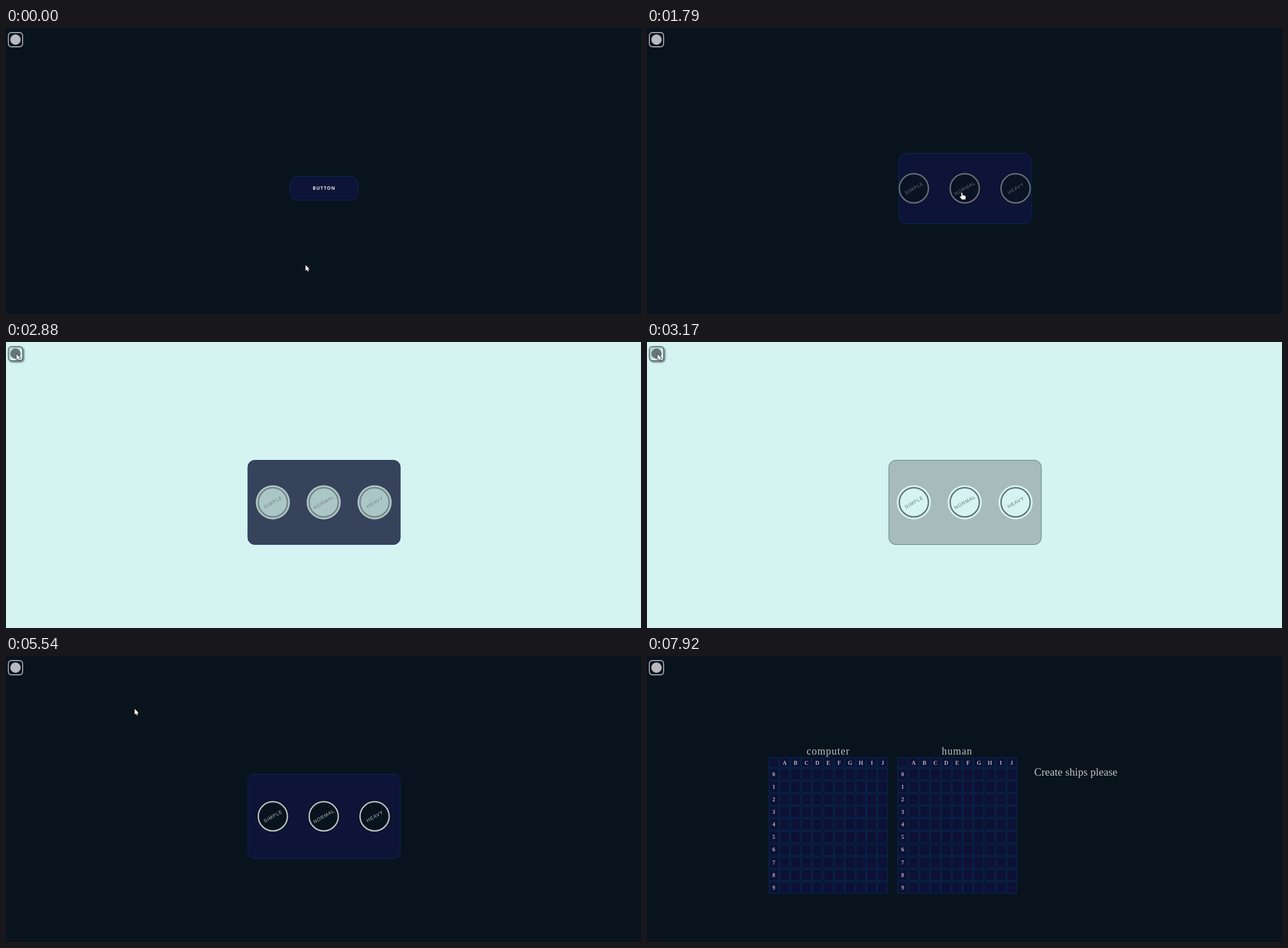
Recreate the animation shown at these times as an HTML page with a canvas. Size 1116x502 px, loop 8.96 s.

```html
<!DOCTYPE html>
<html lang="en">
<head>
<meta charset="utf-8">
<title>Board game intro</title>
<style>
html, body { margin: 0; width: 100%; height: 100%; overflow: hidden; background: #08131e; }
canvas { display: block; }
</style>
</head>
<body>
<canvas id="stage" width="1116" height="502"></canvas>
<script>
const ctx = document.getElementById('stage').getContext('2d');
const LOOP = 8960;
const TO_LIGHT = 2880, TO_DARK = 5000, BOARDS = 6060;
const SANS = '"Liberation Sans", Arial, sans-serif';
const SERIF = '"Liberation Serif", "Times New Roman", serif';

// Each colour is a [dark, light] pair.
const BG = [[8, 19, 30], [213, 243, 241]];
const PANEL = [[13, 20, 55], [167, 188, 186]];
const EDGE = [[6, 43, 92], [78, 130, 136]];
const INK = [[185, 188, 190], [100, 116, 116]];

const clamp = v => Math.max(0, Math.min(1, v));
const lerp = (a, b, p) => a + (b - a) * p;
const ramp = (t, from, to) => clamp((t - from) / (to - from));
const linear = p => p;
const smooth = p => p * p * (3 - 2 * p);
const easeIn = p => p * p;
const easeOut = p => 1 - (1 - p) ** 2;
const tint = ([a, b], p, alpha = 1) =>
  `rgba(${a.map((v, i) => Math.round(lerp(v, b[i], p))).join(',')},${alpha})`;

// Pointer moves: start, end, x, y, easing
const HOME = [526, 416];
const MOVES = [
  [300, 980, 553, 289, smooth],
  [1940, 2320, 46, 76, smooth],
  [2320, 2620, 18, 21, easeOut],
  [5400, 5790, 716, 262, smooth],
  [5790, 5940, 659, 275, smooth],
  [6700, 7230, 820, 330, easeIn],
  [7230, 7650, 1046, 477, easeOut],
  [7650, 7920, 1090, 520, linear]
];

function pointerAt(t) {
  let [x, y] = HOME;
  for (const [from, to, nextX, nextY, ease] of MOVES) {
    const p = ease(ramp(t, from, to));
    x = lerp(x, nextX, p);
    y = lerp(y, nextY, p);
  }
  return [x, y];
}

function box(x, y, w, h, r, fill, stroke, line = 1) {
  ctx.beginPath();
  ctx.roundRect(x, y, w, h, r);
  ctx.fillStyle = fill;
  ctx.fill();
  ctx.strokeStyle = stroke;
  ctx.lineWidth = line;
  ctx.stroke();
}

function disc(x, y, r, fill) {
  ctx.beginPath();
  ctx.arc(x, y, r, 0, 7);
  ctx.fillStyle = fill;
  ctx.fill();
}

function label(text, x, y, font, color, gap = 0, align = 'center') {
  ctx.font = font;
  ctx.letterSpacing = gap + 'px';
  ctx.textAlign = align;
  ctx.fillStyle = color;
  ctx.fillText(text, align === 'center' ? x + gap / 2 : x, y);
}

function drawToggle(light) {
  ctx.save();
  if (light) {
    ctx.shadowColor = 'rgba(40,60,60,.6)';
    ctx.shadowBlur = 3;
    ctx.shadowOffsetX = ctx.shadowOffsetY = 2;
  }
  box(4.1, 8, 25.2, 25, 5.5, tint(BG, light), tint([[205, 208, 212], [80, 100, 100]], light), 1.4);
  ctx.restore();
  disc(16.7, 20.4, 9.1, tint([[184, 185, 190], [102, 118, 118]], light));
}

function drawCircle(x, text, p) {
  const y = 281.4;
  const glow = ctx.createRadialGradient(x, y, 26, x, y, 30);
  glow.addColorStop(0, tint(BG, p));
  glow.addColorStop(1, tint(BG, p, clamp(p * 5)));
  disc(x, y, 30, glow);
  disc(x, y, 25.6, tint(BG, p));
  ctx.strokeStyle = tint(INK, p);
  ctx.lineWidth = 2.5;
  ctx.stroke();
  ctx.save();
  ctx.translate(x, y);
  ctx.rotate(-Math.PI / 6);
  label(text, 0, 3, '8.5px ' + SANS, tint(INK, p), .9);
  ctx.restore();
}

function drawPanel(t) {
  const open = ramp(t, 1600, 1850);
  const [start, from, to] = t < TO_DARK ? [TO_LIGHT, 0, 1] : [TO_DARK, 1, 0];
  const fade = ramp(t, start - 70, start + 190);
  const shift = t < start ? 0 : fade;
  const w = lerp(119, 268, open), h = lerp(41, 148, open);
  box(559 - w / 2, 281.5 - h / 2, w, h, 12,
    tint(PANEL, lerp(from, to, shift)), tint(EDGE, lerp(from, to, shift)));
  if (!open) {
    label('BUTTON', 558.5, 284.2, '700 8.1px "Open Sans", sans-serif', '#e2e4e8', 1);
    return;
  }
  // The nested circles settle faster than the panel.
  const circles = lerp(from, to, 1 - (1 - shift) ** 5);
  ctx.globalAlpha = clamp(open * 2 - 1);
  ['SIMPLE', 'NORMAL', 'HEAVY'].forEach((s, i) => drawCircle(469 + 89.4 * i, s, circles));
  ctx.globalAlpha = 1;
}

function drawBoard(x, title) {
  const ink = '#b4b5b9', font = 'bold 10px ' + SERIF;
  const pitch = 19.15;
  label(title, x + 104.1, 173, '18px ' + SERIF, '#bcbec1', 1);
  for (let row = 0; row < 11; row++) {
    const top = row ? 196.9 + 22.1 * (row - 1) : 178;
    for (let col = 0; col < 11; col++) {
      box(Math.round(x + pitch * col) + .5, Math.round(top) + .5, 17, row ? 20 : 17, 0, '#0d1135', '#052b5c');
    }
    if (row) label(row - 1, x + 8.8, top + 13.9, font, ink);
  }
  [...'ABCDEFGHIJ'].forEach((s, i) => label(s, x + 28.1 + pitch * i, 190.5, font, ink));
}

function drawBoards(t) {
  ctx.globalAlpha = ramp(t, 5940, 6180);
  drawBoard(213.85, 'computer');
  drawBoard(440.4, 'human');
  ctx.globalAlpha = ramp(t, 6310, 6830);
  label('Create ships please', 680.5, 210, '19.1px ' + SERIF, '#c0c2c5', 0, 'left');
  ctx.globalAlpha = 1;
}

const ARROW = new Path2D('M0 0V10.2L2.3 8.1L3.9 11.4L5.6 10.6L4.1 7.4H7.2Z');
const HAND = new Path2D('M-1 .5Q0-.7 1 .5V4.6L5.6 5.5Q7 6 6.8 7.6L6 12H.2L-3.6 7.6Q-3.7 6.2-2.4 6.6L-1 7.6Z');

function drawPointer(t) {
  if (t >= 7920) return;
  const [x, y] = pointerAt(t);
  const overButton = t < 2000 && y < 303;
  const overCircle = t < BOARDS && Math.hypot(x - 648, y - 281) < 27;
  const shape = overButton || overCircle ? HAND : ARROW;
  ctx.save();
  ctx.translate(x + .4, y);
  ctx.lineJoin = 'round';
  ctx.lineWidth = 1.2;
  ctx.strokeStyle = '#05080c';
  ctx.fillStyle = '#fff';
  ctx.stroke(shape);
  ctx.fill(shape);
  ctx.restore();
}

function draw(t) {
  const light = t >= TO_LIGHT && t < TO_DARK ? 1 : 0;
  ctx.fillStyle = tint(BG, light);
  ctx.fillRect(0, 0, 1116, 502);
  drawToggle(light);
  if (t < BOARDS) drawPanel(t);
  else drawBoards(t);
  drawPointer(t);
}

const start = performance.now();
function tick() {
  draw((performance.now() - start) % LOOP);
  requestAnimationFrame(tick);
}
tick();
</script>
</body>
</html>
```
